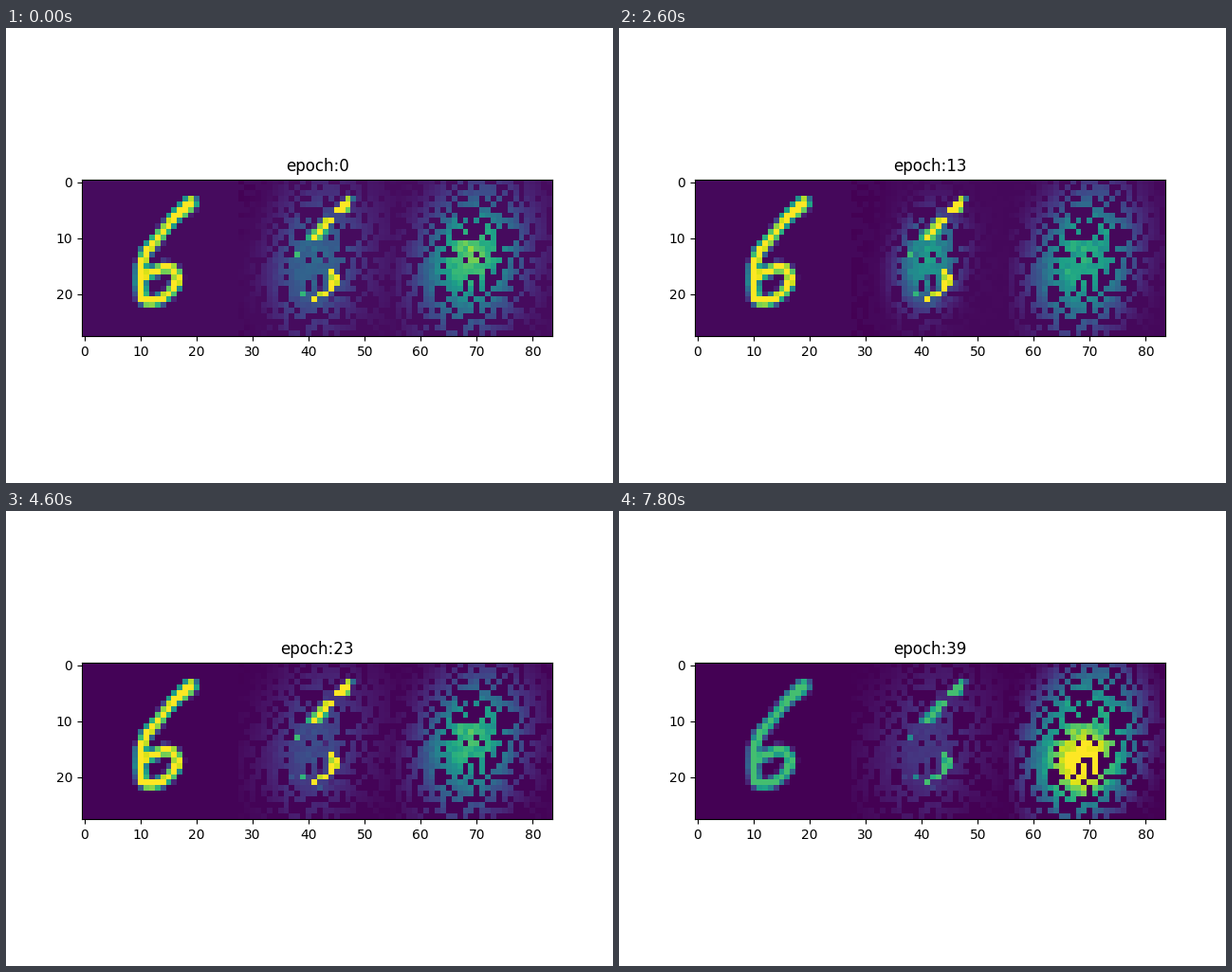
A matplotlib script that plays this animation: 640 px wide and 480 px high, repeating every 8000 ms.

```python
import numpy as np
import matplotlib.pyplot as plt
from matplotlib.animation import FuncAnimation

N = 28
EPOCHS = 40
ROW, COL = np.mgrid[0:N, 0:N].astype(float)

# Pen path of the digit as (column, row) key points
PATH = [(18.9, 3.8), (16, 6.6), (13.5, 9.5), (11, 12.4), (10.1, 15),
        (10, 18), (10.3, 20.8), (11.4, 21.5), (13, 21.2), (15.2, 19.9),
        (16.5, 18), (16.6, 16.6), (15.6, 15.4), (14, 15.3), (10.8, 16.6)]


def draw_digit():
    dist = np.full((N, N), 99.0)
    for (x0, y0), (x1, y1) in zip(PATH, PATH[1:]):
        dx, dy = x1 - x0, y1 - y0
        t = ((COL - x0) * dx + (ROW - y0) * dy) / (dx * dx + dy * dy)
        t = np.clip(t, 0, 1)
        dist = np.minimum(dist, np.hypot(COL - x0 - t * dx,
                                         ROW - y0 - t * dy))
    tip = .25 * (ROW < 7)  # the pen presses harder at the start
    return np.clip(1.4 + tip - .95 * dist, 0, 1)


def blob(cx, cy, sx, sy, power):
    r = np.hypot((COL - cx - .12 * (14 - ROW)) / sx, (ROW - cy) / sy)
    return np.exp(-r ** power)


def bump(epoch, centre, width):
    return np.exp(-((epoch - centre) / width) ** 2)


rng = np.random.default_rng(6)
digit = draw_digit()

# Known cells: a random scatter, plus the arm and right side of the digit
arm = (ROW < 11) & (ROW != 6) & (digit > .6)
bowl = (COL > 14) & (ROW > 15) & (ROW < 21) & (digit > .85)
scatter = rng.random((N, N)) < np.where(digit > .1, .15, .42)
known = arm | bowl | scatter
grain = rng.normal(0, 1, (N, N))


def panels(epoch):
    late = np.clip((epoch - 26) / 13, 0, 1)
    dip = bump(epoch, 13, 3)
    floor = .02 * np.clip((26 - epoch) / 6, 0, 1) + .06 * bump(epoch, 4, 3)
    noise = np.random.default_rng(100 + epoch).normal(0, 1, (N, N))
    texture = 1 + .05 * grain + .03 * noise
    haze = (.05 - .04 * dip) * blob(13.5, 14, 15, 17, 4)

    # Filled-in cells of the middle panel
    k = 1.05 - .28 * dip
    level = .25 - .14 * epoch / 39 + .31 * dip
    fill = level * blob(13.3, 14, 7 * k, 10.5 * k, 2.5) + haze
    fill = fill * texture - floor * np.exp(-(COL / 6) ** 4)

    # Generated cells of the right panel
    k = 1 + .18 * late + .13 * bump(epoch, 4, 3)
    body = .42 + .1 * late + .13 * bump(epoch, 13, 6)
    core = .26 + .24 * late - .25 * bump(epoch, 15, 7)
    fake = body * blob(13, 14, 8.8 * k, 12.3 * k, 2.7 + 1.3 * late) + haze
    fake += core * blob(13, 13 + 4.5 * late ** 2, 5.5, 6, 2 + late)
    fake = fake * texture

    ink = digit * (1 - .3 * late ** 3)
    left = np.maximum(ink, floor)
    middle = np.where(known, left, floor + fill)
    right = np.where(known, floor, floor + fake)
    return np.clip(np.hstack([left, middle, right]), 0, 1)


fig, ax = plt.subplots(figsize=(6.4, 4.8), dpi=100)
image = ax.imshow(panels(0), cmap="viridis", vmin=0, vmax=1)
title = ax.set_title("epoch:0")


def update(epoch):
    image.set_data(panels(epoch))
    title.set_text(f"epoch:{epoch}")
    return image, title


anim = FuncAnimation(fig, update, frames=EPOCHS, interval=200,
                     repeat=True, repeat_delay=0, blit=False)
plt.show()
```
